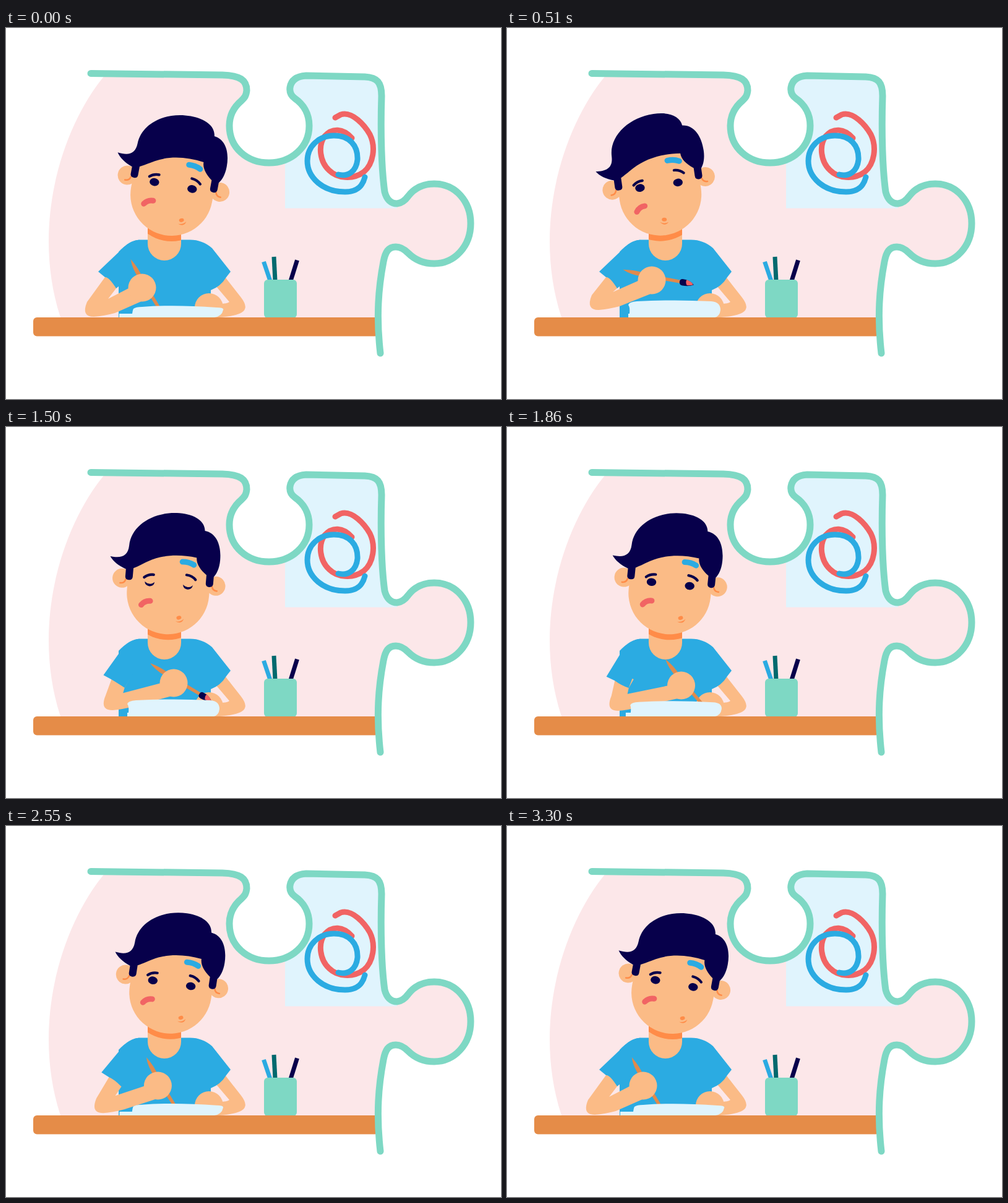
Animation, 800 px wide and 600 px high, one loop 3.33 s. Source, as an HTML page:

```html
<!DOCTYPE html>
<html lang="en">
<head>
<meta charset="utf-8">
<title>Painting boy</title>
<style>
  html, body { margin: 0; width: 100%; height: 100%; overflow: hidden; background: #fff; }
  svg { display: block; width: 100vw; height: 100vh; }
  .line { fill: none; stroke-linecap: round; stroke-linejoin: round; }
  .skin { fill: #fbbb86; }
  .shirt { fill: #2babe2; }
  .navy { fill: #07004b; }
</style>
</head>
<body>
<svg viewBox="0 0 800 600">
  <defs>
    <clipPath id="room"><path id="roomShape"/></clipPath>
    <clipPath id="neck"><path d="M229 318H283V349A27 27 0 0 1 229 349Z"/></clipPath>
  </defs>

  <g clip-path="url(#room)">
    <rect width="800" height="600" fill="#fce7e9"/>
    <rect x="451" y="60" width="181" height="231.500" fill="#e0f4fd"/>
  </g>
  <g class="line" stroke-width="9">
    <path stroke="#f16464" d="M532 145L541 140C560 134 580 158 588 172C598 192 594 220 578 233C560 246 535 243 522 230C507 216 504 190 515 175C527 161 545 162 559 178"/>
    <path stroke="#2babe2" d="M537 237C553 241 566 232 568 213C569 190 555 174 530 174C505 174 487 192 487 215C487 240 510 265 548 265C570 265 577 253 580 241"/>
  </g>
  <g fill="none" stroke-width="7">
    <path stroke="#2babe2" d="M416.500 378L427 409"/>
    <path stroke="#00696e" d="M433 370L435 409"/>
    <path stroke="#07004b" d="M470.500 375.500L460 409"/>
  </g>
  <rect x="417" y="407" width="53" height="62" rx="6" fill="#7ed8c4"/>

  <path class="skin" d="M348 395L380 436Q393 453 381 460Q371 466 345 468H320V445L345 446Q358 446 361 443L333 410Z"/>
  <path class="shirt" d="M216 342.500H296Q317 342 333 356L363 394L356 403Q347 418 331 424V468H182V362Q200 343 216 342.500Z"/>
  <circle class="skin" cx="328" cy="452" r="23"/>
  <g clip-path="url(#neck)">
    <rect class="skin" x="220" y="310" width="70" height="70"/>
    <circle id="shade" r="66.500" fill="#ff8c48"/>
  </g>
  <path id="arm" class="skin"/>
  <path id="sleeve" class="shirt"/>
  <g id="hand">
    <g id="brush">
      <path fill="#e08a4c" d="M-49 -8Q-30 -11.500 -14 -9L47 -9V-4L-14 -3Q-35 -2 -49 -8Z"/>
      <path class="navy" d="M50 -11.500H55Q64 -10 68 -5.500Q61 -1.500 50 -1Q44.500 -1 44.500 -6.500Q44.500 -11.500 50 -11.500Z"/>
      <path fill="#f16464" d="M55 -11.500Q64 -10.500 67 -5.500Q62 -3 57 -3Q54 -7 55 -11.500Z"/>
    </g>
    <circle class="skin" r="22.500"/>
  </g>
  <path id="paper" fill="#e0f4fd"/>
  <rect x="44" y="468" width="558" height="30.500" rx="6" fill="#e58c48"/>

  <g id="head">
    <g class="skin">
      <circle cx="180.500" cy="250.500" r="15.500"/>
      <circle cx="332.500" cy="250.500" r="15.500"/>
      <path d="M190 200H323V268.500A66.500 66.500 0 0 1 190 268.500Z"/>
    </g>
    <path class="line" stroke="#ff8c48" stroke-width="2.500" d="M178 258.500Q185 258.500 186.500 252M335 258.500Q328 258.500 326.500 252"/>
    <g class="navy">
      <ellipse cx="225.500" cy="253.500" rx="7.700" ry="6.300"/>
      <ellipse cx="287.500" cy="253.500" rx="7.700" ry="6.300"/>
    </g>
    <g id="lids" class="skin">
      <ellipse cx="225.500" cy="253.500" rx="9" ry="7"/>
      <ellipse cx="287.500" cy="253.500" rx="9" ry="7"/>
    </g>
    <g class="line" stroke-width="9">
      <path stroke="#f16464" d="M215 291Q220 283.500 229 283.500"/>
      <path stroke="#2babe2" d="M275.500 216Q286 215 294.500 219.500"/>
    </g>
    <g id="mouth" fill="#ff8c48">
      <ellipse cy="-3" rx="4" ry="3"/>
      <path d="M-7 1Q0 5 7 1Q1 9 -7 1Z"/>
    </g>
    <g class="line" stroke="#07004b" stroke-width="4.200">
      <path id="leftBrow" d="M216 248Q222 242.500 231 242.500"/>
      <path id="rightBrow" d="M284 232.500Q293 233 299 239"/>
    </g>
    <path class="navy" d="M158.500 217C176 219 187 215 187.500 197C188 163 224 138 264 138C290 138 306 148 307.500 163C327 165 336 185 336 208C336 222 332 231 328 236V247Q328 253 322 253Q316 253 316 247V234C305 226 298 217 298 207.500C270 204 243 207 220 220C208 227 202 231 197.500 233V247Q197.500 252.500 191.500 252.500Q185.500 252.500 185.500 247V235.500C173 231 164 225 158.500 217Z"/>
  </g>

  <path id="outline" class="line" stroke="#7ed8c4" stroke-width="11"/>
</svg>
<script>
const $ = id => document.getElementById(id);
const set = (id, name, value) => $(id).setAttribute(name, value);

const edge = 'L350 76C378 77 389 84 389 101C388 110 386 112 380 118C366 130 361 145 361 158' +
  'C361 194 390 218 425 218C461 218 490 193 490 158C490 138 480 123 467 114C460 109 458 103 459 96' +
  'C461 84 470 78 485 77L580 79C600 80 607 88 607 110C605 170 607 230 612 265C615 277 622 284 632 284' +
  'C640 283 645 279 650 272C660 259 675 252 692 252C727 252 751 281 751 316C751 353 725 381 692 381' +
  'C675 381 660 374 650 364C643 357 637 354 630 354C618 354 613 362 610 378';
set('outline', 'd', 'M137 73.500' + edge + 'C602 420 598 465 605 526');
set('roomShape', 'd', 'M160 76' + edge + 'C604 410 601 440 601 468H88C40 320 90 160 160 76Z');

const LOOP = 3330;
const times = [0, 510, 990, 1110, 1500, 2220, 2700, 2940, LOOP];
const tracks = {
  tilt:   [10.4, -8.2, 0, 1.5, 4.9, 6.8, 9.4, 10.2, 10.4],
  glance: [1, .1, 0, .2, .91, .96, .99, 1, 1],
  handX:  [220, 234, 236, 237, 271, 286, 229, 222, 220],
  handY:  [420, 408, 407, 407, 414, 420, 420, 420, 420],
  elbowX: [142, 148, 149, 149, 172, 183, 147, 143, 142],
  elbowY: [454, 443, 442, 442, 445, 447, 453, 454, 454],
  swing:  [0, 0, 0, 0, .65, 1, .15, .02, 0],
  brush:  [59, 11, 7, 8, 31, 60, 58, 57, 59],
  press:  [1, 0, 0, 0, 0, .75, 1, 1, 1]
};

// Monotone cubic through the keys, flat at turning points
function sample(values, t) {
  const slope = i => (values[i + 1] - values[i]) / (times[i + 1] - times[i]);
  const tangent = i => {
    if (i === 0 || i === times.length - 1) return 0;
    const a = slope(i - 1), b = slope(i);
    return a * b <= 0 ? 0 : 2 * a * b / (a + b);
  };
  let i = 0;
  while (t >= times[i + 1]) i++;
  const span = times[i + 1] - times[i], u = (t - times[i]) / span, v = 1 - u;
  return values[i] * v * v * (1 + 2 * u) + values[i + 1] * u * u * (3 - 2 * u) +
    span * u * v * (tangent(i) * v - tangent(i + 1) * u);
}

const blink = t => Math.max(0, ...[1500, 2940].map(c => Math.min(1, 2 - Math.abs(t - c) / 75)));

function draw(t) {
  const p = {};
  for (const key in tracks) p[key] = sample(tracks[key], t);
  const { tilt, glance, handX: hx, handY: hy, elbowX: ex, elbowY: ey, swing } = p;
  const mix = (a, b, k = swing) => (a + (b - a) * k).toFixed(2);
  const press = (a, b) => mix(a, b, p.press);

  const rad = tilt * Math.PI / 180;
  set('head', 'transform', `rotate(${tilt} 256.5 330)`);
  set('shade', 'cx', 256.5 + 61.5 * Math.sin(rad));
  set('shade', 'cy', 339 - 61.5 * Math.cos(rad));
  set('mouth', 'transform', `translate(${254 + 27 * glance} ${313 - 4 * glance}) rotate(${12 - 37 * glance})`);
  set('leftBrow', 'transform', `translate(0 ${-2 * glance})`);
  set('rightBrow', 'transform', `translate(0 ${4.5 * glance})`);
  set('lids', 'transform', `translate(0 ${-14 + 9.5 * blink(t)})`);

  const outer = [mix(160, 176), mix(403, 411)], inner = [mix(178, 199), mix(421, 422)];
  set('arm', 'd', `M${+outer[0] + 8} ${outer[1] - 12}L${outer}L${ex - 11} ${ey - 11}
    Q${ex - 21} ${ey + 13} ${ex} ${ey + 13}Q${ex + 15} ${ey + 12} ${ex + 34} ${ey + 7}
    L${hx + 8} ${hy + 18}L${hx - 20} ${hy}L${ex + +mix(23, 14)} ${ey + +mix(-16, -14)}
    L${inner}L${+inner[0] + 8} ${inner[1] - 14}Z`);
  set('sleeve', 'd', `M216 342.5Q202 343 ${mix(190, 188)} ${mix(355, 359)}
    L${mix(149, 162)} ${mix(394, 405)}L${outer}Q${mix(166, 187)} ${mix(402, 420)} ${inner}
    L205 400V350Z`);

  set('hand', 'transform', `translate(${hx} ${hy})`);
  set('brush', 'transform', `rotate(${p.brush})`);
  set('paper', 'd', `M${press(198, 204)} 462Q${press(199, 205)} ${press(451, 455)} ${press(196, 206)} ${press(448, 454)}
    Q${press(197, 210)} ${press(443, 451)} ${press(210, 220)} ${press(442, 451)}
    Q270 ${press(439, 447)} ${press(330, 340)} ${press(442, 452)}
    Q${press(345, 353)} ${press(443, 452)} ${press(345, 351)} 456
    Q${press(344, 349)} 466 ${press(336, 337)} 468H${press(196, 183)}V462Z`);
}

function frame() {
  draw(performance.now() % LOOP);
  requestAnimationFrame(frame);
}
frame();
</script>
</body>
</html>
```
